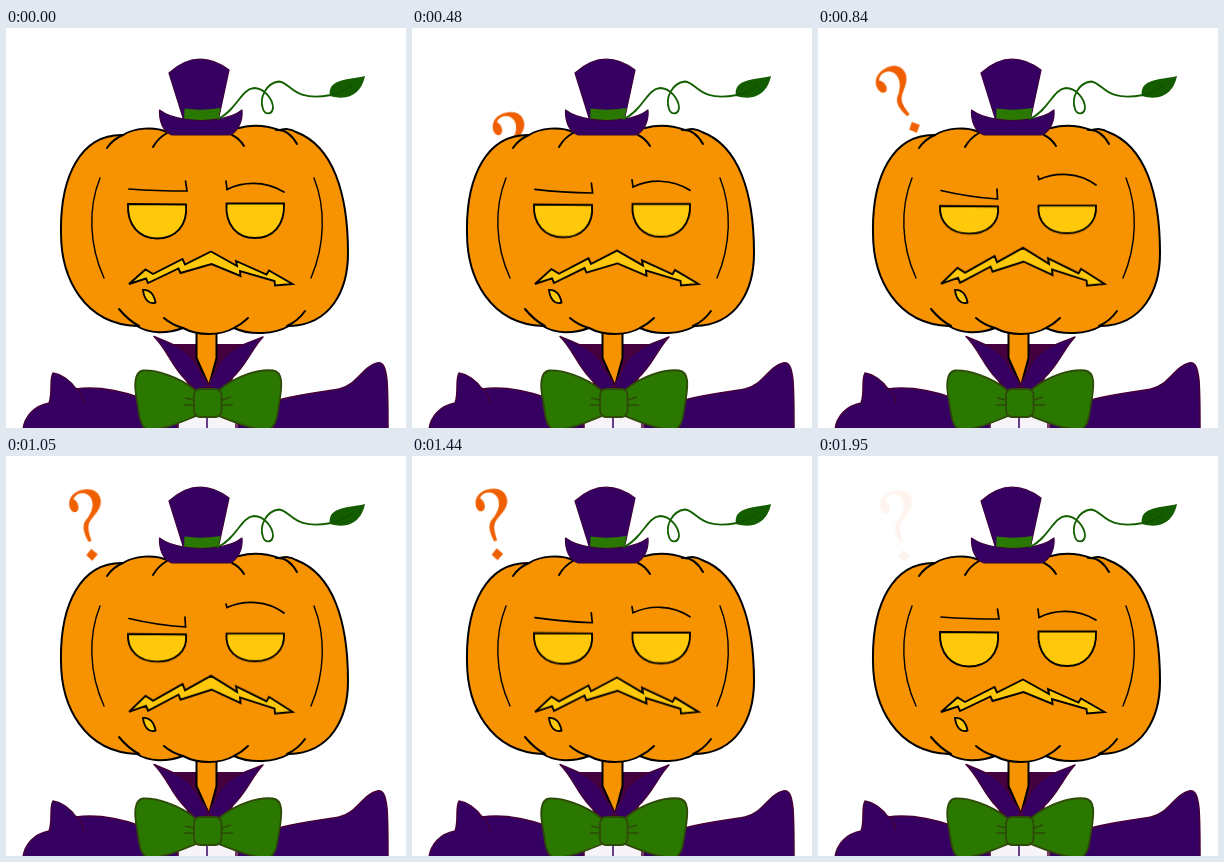
These frames come from a looping animation (400 by 400 pixels, 2.01 s). An HTML page:

```html
<!DOCTYPE html>
<html lang="en">
<head>
<meta charset="utf-8">
<title>Puzzled pumpkin</title>
<style>
  html, body { margin: 0; width: 100%; height: 100%; overflow: hidden; background: #fff; }
  svg { display: block; width: 100vw; height: 100vh; }

  .line { fill: none; stroke: #000; stroke-width: 1.7; stroke-linecap: round; }
  .edge { stroke: #000; stroke-width: 2; stroke-linejoin: round; }
  .skin { fill: #f79200; }
  .glow { fill: #ffc80a; stroke: #000; stroke-width: 1.9; }
  .glow path { vector-effect: non-scaling-stroke; }
  .cloth { fill: #350062; stroke: #45003a; stroke-width: 1.5; stroke-linejoin: round; }
  .hat { fill: #350062; stroke: #3c0040; stroke-width: 1.2; stroke-linejoin: round; }
  .bow { fill: #2a7800; stroke: #2f4a08; stroke-width: 1.8; stroke-linejoin: round; }
  .vine { fill: none; stroke: #135f00; stroke-width: 1.8; stroke-linecap: round; }

  .mark, .eyes, .mouth, .brow { animation: 2010ms infinite; }

  /* pops up behind the head, swings, fades */
  .mark { fill: #ef5f00; transform-origin: 82px 66px; animation-name: swing, fade; animation-duration: 2010ms, 2010ms; }
  @keyframes swing {
    0%, 14.9% { transform: translate(26px, 98px) rotate(0deg); animation-timing-function: ease-in; }
    23.9% { transform: translate(18px, 52px) rotate(-6deg); animation-timing-function: linear; }
    28.4% { transform: translate(6px, 18px) rotate(-11deg); animation-timing-function: ease-out; }
    33% { transform: translate(1px, 5px) rotate(-18deg); animation-timing-function: ease-out; }
    41% { transform: translate(.5px, 4.5px) rotate(-24deg); animation-timing-function: ease-in-out; }
    52.2% { transform: translate(0, 1px) rotate(-5deg); animation-timing-function: ease-out; }
    64.2% { transform: translate(0, 0) rotate(0deg); animation-timing-function: ease-in-out; }
    80.6% { transform: translate(0, 1px) rotate(-9deg); animation-timing-function: ease-in-out; }
    97%, 100% { transform: translate(-.5px, 2px) rotate(-6deg); }
  }
  @keyframes fade {
    0%, 72% { opacity: 1; animation-timing-function: linear; }
    99%, 100% { opacity: 0; }
  }

  /* squint and frown */
  .eyes { transform-origin: 200px 186px; animation-name: squint; }
  .mouth { transform-origin: 205px 258px; animation-name: frown; }
  .left { animation-name: lower; }
  .right { animation-name: raise; }
  @keyframes squint {
    0%, 3% { transform: scaleY(1); animation-timing-function: cubic-bezier(.6, 0, .8, .65); }
    41%, 53% { transform: scaleY(.8); animation-timing-function: ease-in-out; }
    92%, 100% { transform: scaleY(1); }
  }
  @keyframes frown {
    0%, 3% { transform: scaleY(1); animation-timing-function: cubic-bezier(.6, 0, .8, .65); }
    41%, 53% { transform: scaleY(1.11); animation-timing-function: ease-in-out; }
    92%, 100% { transform: scaleY(1); }
  }
  @keyframes lower {
    0%, 3% { d: path("M123 161 Q150 163 181 163 L179.500 153"); animation-timing-function: cubic-bezier(.6, 0, .8, .65); }
    41%, 53% { d: path("M123 162.500 Q150 169 179.500 171 L179 161"); animation-timing-function: ease-in-out; }
    89%, 100% { d: path("M123 161 Q150 163 181 163 L179.500 153"); }
  }
  @keyframes raise {
    0%, 3% { d: path("M220 153 L221 161.500 C236 154 258 152 278 164"); animation-timing-function: cubic-bezier(.6, 0, .8, .65); }
    41%, 53% { d: path("M220 148 L221 151.500 C238 144 261 144 278 157"); animation-timing-function: ease-in-out; }
    89%, 100% { d: path("M220 153 L221 161.500 C236 154 258 152 278 164"); }
  }
</style>
</head>
<body>
<svg viewBox="0 0 400 400">
  <g class="mark">
    <path d="M71 54C66 55 63 47 66 41C70 32 87 29 94 37C100 46 95 53 88 60C82 66 80 70 84 84L81 85C76 74 76 68 80 63C87 56 90 48 87 41C83 34 73 34 69.500 41C74 43 76 52 71 54Z"/>
    <path d="M83 92L89 98L83 104L77.500 98Z"/>
  </g>

  <!-- body -->
  <path class="cloth" d="M17 401C19 388 28 378 43 375C47 365 43 352 47 345C55 346 64 352 70 361C92 358 115 363 135 370L171 392V401Z"/>
  <path class="cloth" d="M70 360Q77 366 78 375" style="fill:none"/>
  <path class="cloth" d="M268 373C290 367 315 364 333 361C350 358 357 338 371 335C379 333 380 345 381 352C382 365 382 380 382 401H232V392Z"/>
  <path d="M164 316H242L222 362H184Z" fill="#45003f"/>
  <path class="cloth" d="M172 386H230V402H172Z" style="fill:#f6f3f9"/>
  <path d="M201 388V400" stroke="#350062" stroke-width="1.5"/>
  <path class="skin edge" d="M190.500 300V330L203 358L210.500 330V300Z"/>
  <path class="cloth" d="M148 308.500C163 315 181 320 190 336C194 345 200 350 202.500 358L191 364L178 350C166 338 160 320 148 308.500Z"/>
  <path class="cloth" d="M257 309C242 315 222 320 213 336C210 345 205 350 202.500 358L214 364L226 350C240 338 246 320 257 309Z"/>

  <!-- bow tie -->
  <g class="bow">
    <path d="M189 362C172 348 150 342 137 342.500C128 344 128 358 131 372C133 384 133 398 142 402C160 401 175 394 190 388Z"/>
    <path d="M213 362C231 347 253 341 267 342.500C277 344 276 357 274 370C271 384 272 398 262 402C245 401 228 394 213 388Z"/>
    <rect x="188" y="361" width="27.500" height="28" rx="6"/>
    <path d="M179 370L188 372M178 377H188M216 372L225 369M216 377H227" fill="none" stroke-width="1.400"/>
  </g>

  <!-- head -->
  <path class="skin edge" d="M117 107C75 106 54 148 55 205C55 250 78 296 131 298C143 306 161 306 177 300C192 308 214 308 228 300C245 308 269 306 283 298C325 297 342 262 342 225C342 165 327 118 290 104C284 100 279 101 273 102C259 97 244 97 233 100C210 103 184 106 161 104C148 98 128 100 117 107Z"/>
  <g class="line edge">
    <path d="M101 120Q107 111 117 107M147 119Q152 110 161 105M226 107Q233 110 238 118M270 102C279 101 286 107 291 116"/>
    <path d="M113 281Q122 292 133 298M158 290Q166 297 177 300M242 290Q236 296 228 300M299 283Q292 293 281 298"/>
  </g>
  <path class="line" style="stroke-width:1.4" d="M94 150C82 180 83 217 98 250M308 150C320 180 319 217 305 250"/>

  <!-- face -->
  <g class="eyes glow">
    <path d="M122 176L180 176.500C182 198 169 210.500 151 210.500C133 210.500 121 197 122 176Z"/>
    <path d="M220.500 175.500H278C279 197 267 210 249 210C231 210 219 197 220.500 175.500Z"/>
  </g>
  <path class="line brow left" d="M123 161Q150 163 181 163L179.500 153"/>
  <path class="line brow right" d="M220 153L221 161.500C236 154 258 152 278 164"/>
  <g class="mouth glow">
    <path d="M123 256L139.500 241.500L147 246L176.500 231L179 236.500L205 223.500L231 238L230 233L260.500 246.500L263 242.500L286.500 256L269 257.500L268.500 253L234 243L234.500 248L205.500 236L174.500 245L172.500 240.500L142 255L140 250.500Z"/>
  </g>
  <path class="glow" d="M137 262C143 261 148 266 149.500 274.500C143 277 138 271 137 262Z"/>

  <!-- hat and vine -->
  <path class="hat" d="M163 45Q192 19 223 42L212 93H178Z"/>
  <path d="M178.500 80.500Q195 83 214.500 80L212 94H178Z" fill="#2a7800"/>
  <path class="hat" d="M153.500 82Q163 89 178 91Q195 94 212 91Q227 89 236 82C237 93 232 103 224 107H166C157 104 153 93 153.500 82Z"/>
  <path class="vine" d="M212 91C231 82 235 61 248 60C258 60 267 71 267 80C266 87 259 87 257 81C253 70 260 55 273 53.500C286 55 286 74 325 67"/>
  <path d="M324 68C321 50 344 52 359 48C356 63 345 74 324 68Z" fill="#145c00"/>
  <path d="M325 67Q338 64 346 57" fill="none" stroke="#0f4a00"/>
</svg>
</body>
</html>
```
